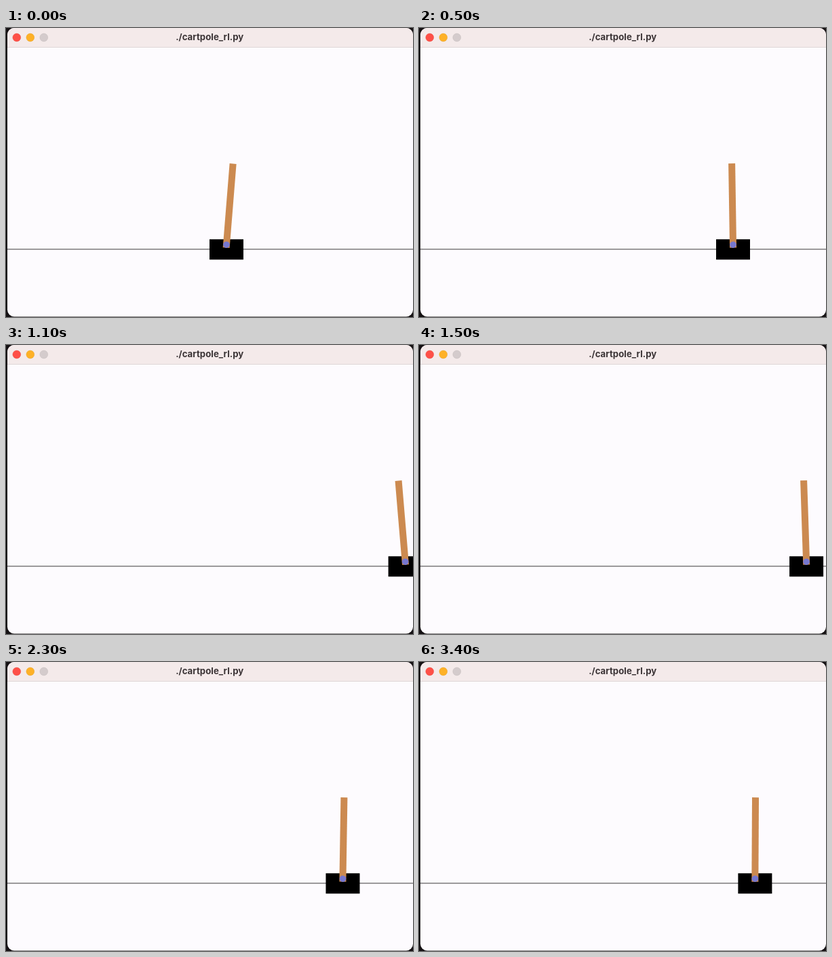
An HTML page that plays this animation: 600x427 px, repeating every 3500 ms.

```html
<!DOCTYPE html>
<html lang="en">
<head>
<meta charset="utf-8">
<title>Cart pole</title>
<style>
  html, body { margin: 0; width: 100%; height: 100%; overflow: hidden; background: #151113; }
  svg { display: block; width: 600px; height: 427px; }
  .title { font: 700 13.25px Inter, "Open Sans", sans-serif; fill: #3c3537; text-anchor: middle; }
</style>
</head>
<body>
<svg viewBox="0 0 600 427">
  <defs>
    <clipPath id="window"><rect x="2" width="598" height="426.4" rx="10"/></clipPath>
  </defs>
  <rect width="600" height="427" fill="#151113"/>
  <g clip-path="url(#window)">
    <rect width="600" height="427" fill="#fdfbfe"/>
    <rect width="600" height="28" fill="#f4eaea"/>
    <rect y="28" width="600" height="1" fill="#dfd6d7"/>
    <g stroke-width=".5">
      <circle cx="15.8" cy="14" r="5.9" fill="#fe5048" stroke="#e8493f"/>
      <circle cx="35.8" cy="14" r="5.9" fill="#feb127" stroke="#e3a026"/>
      <circle cx="55.8" cy="14" r="5.9" fill="#d4cbcc" stroke="#c2babb"/>
    </g>
    <text class="title" x="300.2" y="18">./cartpole_rl.py</text>
    <rect x="2" y="326.4" width="598" height="1" fill="#3a393b"/>
    <g id="cart">
      <rect x="-25" y="312.2" width="50" height="30"/>
      <g id="pole">
        <rect x="-5" y="200.1" width="10" height="124.6" fill="#cc8a50"/>
        <circle cy="320.2" r="4.8" fill="#7677cf"/>
      </g>
    </g>
  </g>
</svg>
<script>
  const LOOP = 3500, STEP = 100;
  const cart = document.getElementById('cart');
  const pole = document.getElementById('pole');

  // Key poses
  const poses = [
    { step: 0, x: 325, angle: 4.6 },
    { step: 5, x: 463, angle: -0.9 },
    { step: 11, x: 588.6, angle: -4.8 },
    { step: 15, x: 571.1, angle: -1.9 },
    { step: 20, x: 514.9, angle: 1 },
    { step: 24, x: 494.2, angle: 0.7 },
    { step: 28, x: 497.4, angle: -0.25 },
    { step: 34, x: 495.4, angle: 0.3 }
  ];

  // Natural cubic spline; its slopes are found by relaxation
  function spline(key) {
    const spans = poses.slice(1).map((p, i) => p.step - poses[i].step);
    const rates = spans.map((h, i) => (poses[i + 1][key] - poses[i][key]) / h);
    const slopes = poses.map(() => 0);
    for (let pass = 0; pass < 40; pass++) {
      slopes.forEach((_, i) => {
        let sum = 0, weight = 0;
        for (const [span, next] of [[i - 1, i - 1], [i, i + 1]]) {
          if (!(span in spans)) continue;
          sum += (3 * rates[span] - slopes[next]) / spans[span];
          weight += 2 / spans[span];
        }
        slopes[i] = sum / weight;
      });
    }
    return step => {
      const end = poses.findIndex(p => p.step >= step);
      const i = Math.max(end - 1, 0);
      const u = (step - poses[i].step) / spans[i], v = 1 - u;
      return v * v * (1 + 2 * u) * poses[i][key]
        + u * u * (1 + 2 * v) * poses[i + 1][key]
        + spans[i] * u * v * (v * slopes[i] - u * slopes[i + 1]);
    };
  }

  const cartX = spline('x'), poleAngle = spline('angle');

  function draw(ms) {
    const step = Math.floor((ms % LOOP) / STEP);
    cart.setAttribute('transform', `translate(${cartX(step).toFixed(2)} 0)`);
    pole.setAttribute('transform', `rotate(${poleAngle(step).toFixed(3)} 0 320.2)`);
  }

  let start;
  function tick(now) {
    start ??= now;
    draw(now - start);
    requestAnimationFrame(tick);
  }
  draw(0);
  requestAnimationFrame(tick);
</script>
</body>
</html>
```
